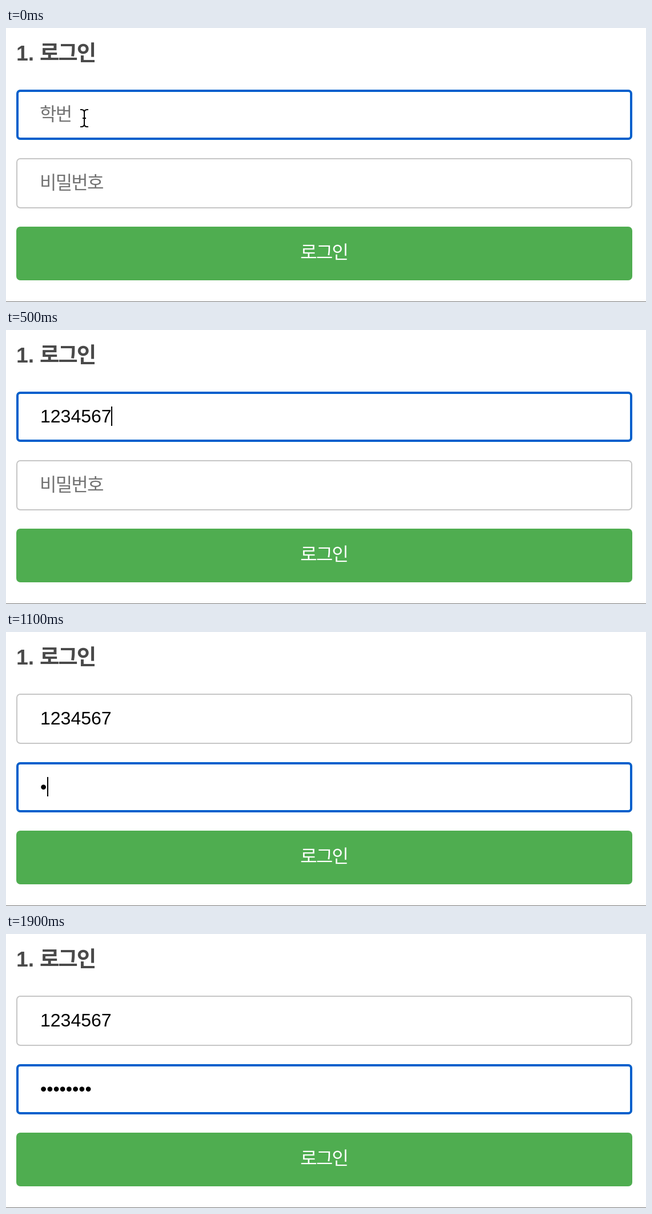
An HTML page for the animation above (2 s loop, 1120 by 480 pixels).

```html
<!DOCTYPE html>
<html lang="ko">
<head>
<meta charset="utf-8">
<title>로그인</title>
<style>
  html, body { margin: 0; width: 100%; height: 100%; overflow: hidden; background: #fff; }
  svg { display: block; width: 1120px; height: 480px; }
  text { font: 32px "Liberation Sans", Arial, sans-serif; }
  .ko { font-family: "Noto Sans CJK KR", "Noto Sans CJK", sans-serif; letter-spacing: -0.055em; }
  .heading { font-size: 37.44px; font-weight: 700; fill: #4a4a4a; }
  .hint { fill: #737373; }
  .box { fill: #fff; stroke: #c6c6c6; stroke-width: 2; }
  .ring { fill: none; stroke: #005fcc; stroke-width: 4; }
  .beam path { fill: none; stroke: #000; stroke-width: 2; }
  .beam .halo { stroke: #fff; stroke-width: 5; }
</style>
</head>
<body>
<svg viewBox="0 0 1120 480">
  <text class="heading" x="18" y="57">1.</text>
  <text class="heading ko" x="59" y="57">로그인</text>

  <g class="field">
    <rect class="box" x="19" y="109" width="1076" height="86" rx="6"/>
    <rect class="ring" x="20" y="110" width="1074" height="84" rx="5"/>
    <text class="hint ko" x="59" y="162">학번</text>
    <text class="value" x="60" y="162"></text>
    <rect class="caret" y="134" width="2" height="34"/>
  </g>

  <g class="field" transform="translate(0 120)">
    <rect class="box" x="19" y="109" width="1076" height="86" rx="6"/>
    <rect class="ring" x="20" y="110" width="1074" height="84" rx="5"/>
    <text class="hint ko" x="59" y="162">비밀번호</text>
    <text class="value" x="60" y="162"></text>
    <rect class="caret" y="134" width="2" height="34"/>
  </g>

  <rect x="18" y="348" width="1078" height="94" rx="7" fill="#4fad50"/>
  <text class="ko" x="515" y="404" fill="#fff">로그인</text>
  <rect y="479" width="1120" height="1" fill="#777"/>

  <g class="beam">
    <path class="halo" d="M-7-15h2q5 0 5 5v20q0 5-5 5h-2M7-15h-2q-5 0-5 5v20q0 5 5 5h2M-3 0h6"/>
    <path d="M-7-15h2q5 0 5 5v20q0 5-5 5h-2M7-15h-2q-5 0-5 5v20q0 5 5 5h2M-3 0h6"/>
  </g>
</svg>
<script>
const LOOP = 2000;

// Each step changes only the properties it lists.
const steps = [
  { at: 0, focus: 0, id: 0, pass: 0, caret: false, mouse: [137, 158] },
  { at: 100, id: 1, caret: true, mouse: null },
  { at: 200, id: 2 },
  { at: 300, id: 4 },
  { at: 400, id: 5 },
  { at: 500, id: 7 },
  { at: 700, mouse: [160, 240] },
  { at: 800, caret: false, mouse: [172, 295] },
  { at: 900, focus: 1, caret: true },
  { at: 1100, pass: 1, mouse: null },
  { at: 1200, pass: 2 },
  { at: 1300, pass: 4 },
  { at: 1400, pass: 5 },
  { at: 1500, pass: 7 },
  { at: 1600, pass: 8 },
  { at: 1900, caret: false }
];

const fields = [...document.querySelectorAll('.field')].map(el => ({
  ring: el.querySelector('.ring'),
  hint: el.querySelector('.hint'),
  value: el.querySelector('.value'),
  caret: el.querySelector('.caret')
}));
const beam = document.querySelector('.beam');
const show = (el, on) => el.setAttribute('visibility', on ? 'visible' : 'hidden');

function drawField(field, text, advance, focused, caretOn) {
  if (field.value.textContent !== text) field.value.textContent = text;
  show(field.hint, !text);
  show(field.ring, focused);
  show(field.caret, focused && caretOn);
  field.caret.setAttribute('x', 2 * Math.round((60 + text.length * advance) / 2));
  field.caret.setAttribute('y', text ? 134 : 136);
}

function draw(time) {
  const state = Object.assign({}, ...steps.filter(step => step.at <= time));
  drawField(fields[0], '1234567'.slice(0, state.id), 17.8, state.focus === 0, state.caret);
  drawField(fields[1], '•'.repeat(state.pass), 11.2, state.focus === 1, state.caret);
  show(beam, state.mouse);
  if (state.mouse) beam.setAttribute('transform', `translate(${state.mouse})`);
}

const start = performance.now();
function tick() {
  draw((performance.now() - start) % LOOP);
  requestAnimationFrame(tick);
}
tick();
</script>
</body>
</html>
```
